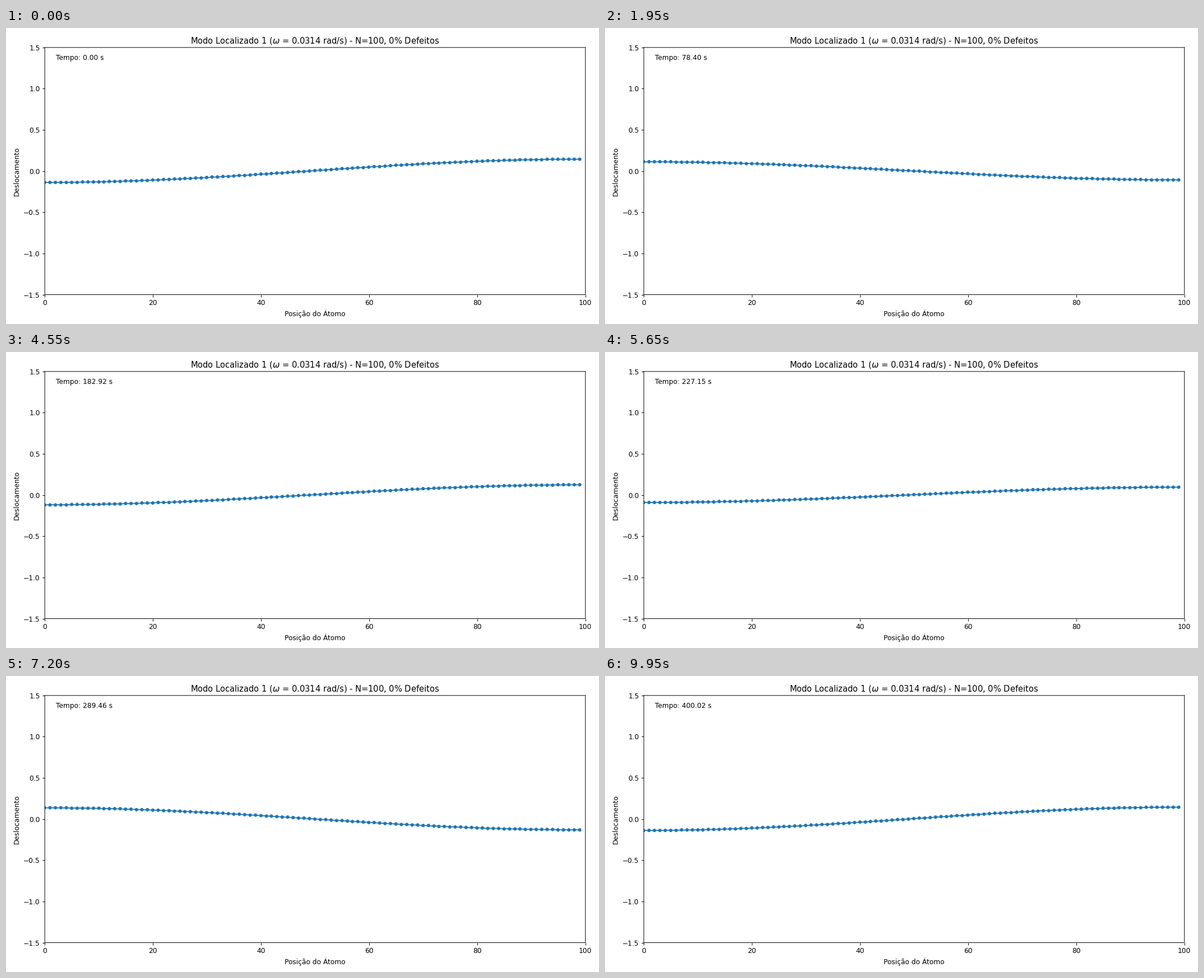
A matplotlib script for the animation above (10000 ms loop, 1058x529 px).

```python
import numpy as np
import matplotlib.pyplot as plt
from matplotlib.animation import FuncAnimation
from matplotlib.transforms import Bbox, IdentityTransform

plt.rcParams.update({
    "font.family": "DejaVu Sans",
    "text.hinting_factor": 9,
    "path.snap": False,
})

N = 100              # atoms in the chain
FRAMES = 200
INTERVAL = 50        # ms
DPI = 88.167         # 12 x 6 in gives 1058 x 529 px
GRID = 100           # layout grid, units per inch

# First vibrational mode of a free chain with unit mass and stiffness
omega = 2 * np.sin(np.pi / (2 * N))
pos = np.arange(N)
mode = -np.sqrt(2 / N) * np.cos(np.pi * (pos + 0.5) / N)
times = np.linspace(0, 4 * np.pi / omega, FRAMES)  # two periods

fig, ax = plt.subplots(figsize=(12, 6), dpi=DPI)
ax.set_xlim(0, N)
ax.set_ylim(-1.5, 1.5)
ax.set_xlabel("Posição do Átomo")
ax.set_ylabel("Deslocamento")
ax.set_title(rf"Modo Localizado 1 ($\omega$ = {omega:.4f} rad/s) - N={N}, 0% Defeitos")

# Lay out on the grid, then align the frame to its cell centres
fig.dpi = GRID
fig.tight_layout()
fig.dpi = DPI
to_px = ax.transData.frozen()
size = fig.get_size_inches() * GRID
corners = np.round(ax.get_position().get_points() * size) + [0.5, -0.5]
ax.set_position(Bbox(corners / size))


def atom_px(y):
    """Pixel positions of the atoms, rounded to the layout grid."""
    px = to_px.transform(np.column_stack([pos, y]))
    return np.round(px * GRID / DPI) * DPI / GRID


line, = ax.plot(pos, mode, color="C0", transform=to_px)
dots = ax.scatter(*atom_px(mode).T, s=np.full(N, 16), color="C0",
                  linewidths=1, transform=IdentityTransform())
clock = ax.text(0.02, 0.95, "", transform=ax.transAxes)


def update(i):
    t = times[i]
    y = mode * np.cos(omega * t)
    line.set_ydata(y)
    dots.set_offsets(atom_px(y))
    clock.set_text(f"Tempo: {t:.2f} s")
    return line, dots, clock


anim = FuncAnimation(fig, update, frames=FRAMES, interval=INTERVAL,
                     repeat=True, repeat_delay=0)
plt.show()
```
